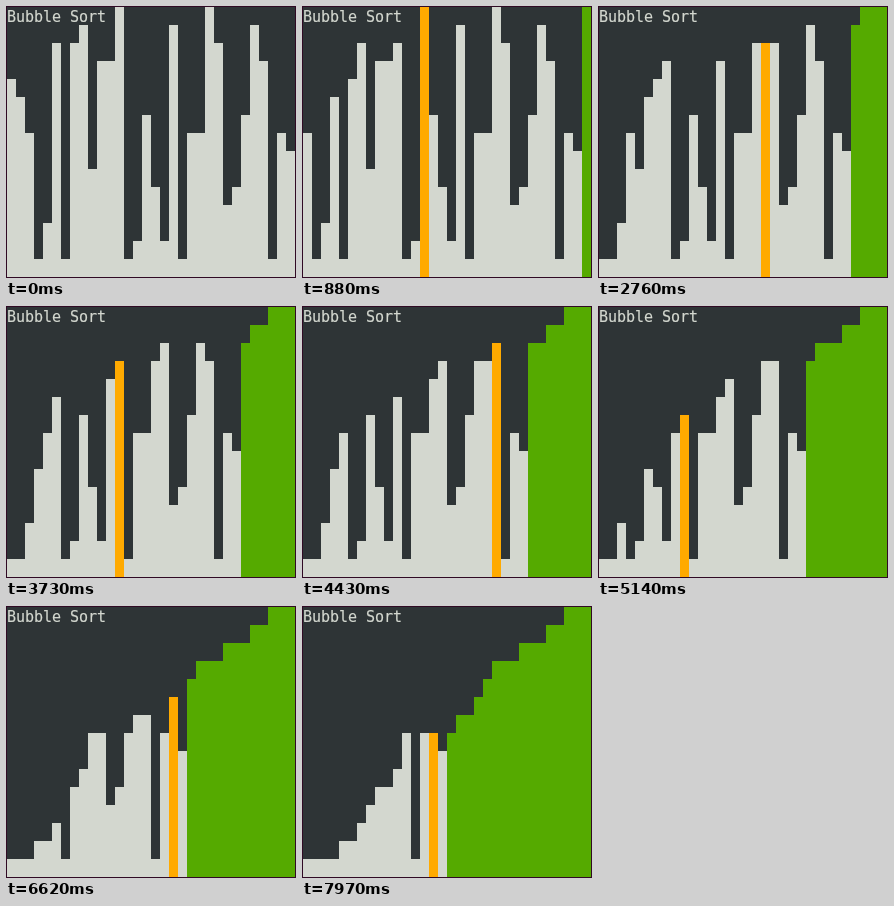
An HTML page for the animation above (8 s loop, 290 px wide and 272 px high).

```html
<!DOCTYPE html>
<html lang="en">
<head>
<meta charset="utf-8">
<title>Bubble Sort</title>
<style>
  html, body { margin: 0; width: 100%; height: 100%; overflow: hidden; background: #300a24; }
  svg { display: block; }
  rect { shape-rendering: crispEdges; }
  text {
    font: 15px "DejaVu Sans Mono", monospace;
    letter-spacing: -.03px;
    fill: #d3d7cf;
    stroke: #d3d7cf;
    stroke-width: .2px;
  }
</style>
</head>
<body>
<svg width="290" height="272" viewBox="0 0 290 272">
  <rect width="290" height="272" fill="#300a24"/>
  <rect x="1" y="1" width="288" height="270" fill="#2e3436"/>
  <g id="bars"></g>
  <rect x="1" y="1" width="99" height="18" fill="#2e3436"/>
  <text x="1" y="16">Bubble Sort</text>
</svg>
<script>
const LOOP = 8000;    // ms
const STEP = 20.53;   // ms per comparison
const LEAD = 2.03;    // comparisons done before the loop starts
const HOLD = 40;      // ms the unsorted values stay on screen
const CELL_W = 9, CELL_H = 18, BOTTOM = 271;
const GREY = '#d3d7cf', ORANGE = '#ffaa00', GREEN = '#55aa00';

// Bar heights in rows, one hex digit per bar
const START = [...'ba813d1df6ccf12952e188fd459ec187'].map(c => parseInt(c, 16));

// One state per comparison, taken before the swap
function sortStates(values) {
  const a = values.slice(), states = [];
  for (let end = a.length; end > 1; end--) {
    for (let j = 0; j < end - 1; j++) {
      states.push({ a: a.slice(), j, end });
      if (a[j] > a[j + 1]) [a[j], a[j + 1]] = [a[j + 1], a[j]];
    }
  }
  return states;
}

const states = sortStates(START);
const unsorted = { a: START, j: -1, end: START.length };

const group = document.getElementById('bars');
const bars = START.map((_, i) => {
  const bar = document.createElementNS('http://www.w3.org/2000/svg', 'rect');
  bar.setAttribute('x', 1 + i * CELL_W);
  bar.setAttribute('width', CELL_W);
  return group.appendChild(bar);
});

function draw(t) {
  const { a, j, end } = t < HOLD ? unsorted : states[Math.floor(t / STEP + LEAD)];
  bars.forEach((bar, i) => {
    const h = a[i] * CELL_H;
    bar.setAttribute('y', BOTTOM - h);
    bar.setAttribute('height', h);
    bar.setAttribute('fill', i >= end ? GREEN : i === j ? ORANGE : GREY);
  });
}

const t0 = performance.now();
function tick() {
  draw((performance.now() - t0) % LOOP);
  requestAnimationFrame(tick);
}
tick();
</script>
</body>
</html>
```
